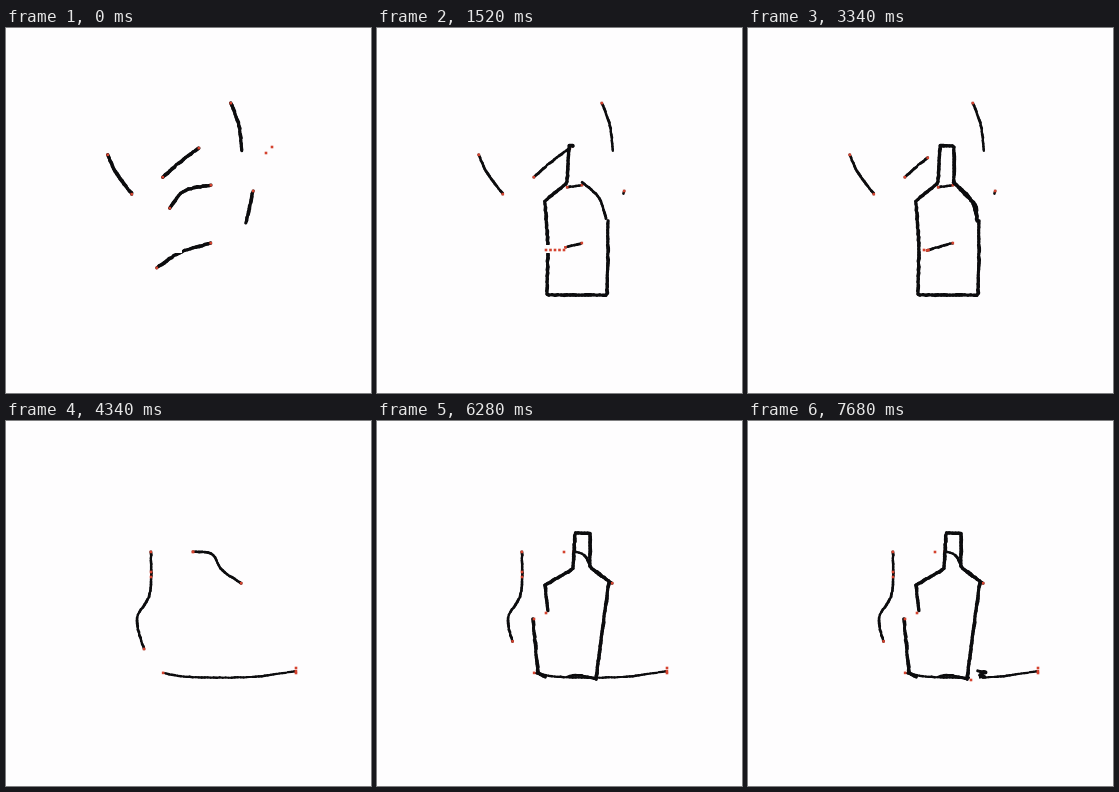
An HTML page with a canvas for the animation above (8000 ms loop, 365 px wide and 365 px high).

```html
<!DOCTYPE html>
<html lang="en">
<head>
<meta charset="utf-8">
<title>Bottle sketch</title>
<style>
html, body { margin: 0; width: 100%; height: 100%; overflow: hidden; background: #fefdfe; }
canvas { display: block; width: 100vw; height: 100vh; filter: blur(0.4px); }
</style>
</head>
<body>
<canvas id="stage" width="365" height="365"></canvas>
<script>
const ctx = document.getElementById('stage').getContext('2d');
const LOOP = 8000, CUT = 4340, STEP = 140;
const PAPER = '#fefdfe', INK = '#0c0c0e', RED = '#d4432f';
const THIN = 2.6, BOLD = 3.4;

const ramp = (k, a, b) => Math.max(0, Math.min(1, (k - a) / (b - a)));
const mix = (a, b, u) => a + (b - a) * u;
const stepAt = (t, start) => t < start ? 0 : Math.floor((t - start) / STEP) + 1;

// Seeded noise in -0.5..0.5
function noise(a, b) {
  const n = Math.sin(a * 12.9898 + b * 78.233) * 43758.5453;
  return n - Math.floor(n) - 0.5;
}

// Catmull-Rom curve through a few keys
function smooth(keys) {
  const out = [keys[0]];
  for (let i = 0; i < keys.length - 1; i++) {
    const b = keys[i], c = keys[i + 1], a = keys[i - 1] || b, d = keys[i + 2] || c;
    for (let u = 0.125; u <= 1; u += 0.125) {
      out.push([0, 1].map(n => b[n] + 0.5 * u * (c[n] - a[n]
        + u * (2 * a[n] - 5 * b[n] + 4 * c[n] - d[n] + u * (3 * (b[n] - c[n]) + d[n] - a[n])))));
    }
  }
  return out;
}

// Draws the stretch from..to of a path with a shaky pen and returns its ends.
function pen(path, width, from = 0, to = 1) {
  const dist = [0];
  for (let i = 1; i < path.length; i++) {
    dist.push(dist[i - 1] + Math.hypot(path[i][0] - path[i - 1][0], path[i][1] - path[i - 1][1]));
  }
  const total = dist[dist.length - 1];
  const at = d => {
    let i = 1;
    while (i < dist.length - 1 && dist[i] < d) i++;
    const u = (d - dist[i - 1]) / (dist[i] - dist[i - 1]);
    return [0, 1].map(n => mix(path[i - 1][n], path[i][n], u) + noise(d, total + n) * width * 0.2);
  };
  const first = at(total * from), end = total * to;
  let p = first;
  for (let d = total * from; d < end;) {
    d = Math.min(d + 3, end);
    const q = at(d);
    ctx.lineWidth = width * (1 + noise(d, total) * 0.25);
    ctx.beginPath();
    ctx.moveTo(...p);
    ctx.lineTo(...q);
    ctx.stroke();
    p = q;
  }
  return [first, p];
}

function dot(x, y) {
  ctx.fillStyle = RED;
  ctx.fillRect(x - 1.3, y - 1.3, 2.6, 2.6);
}

// A loose curve with red end points
function mark(keys, width, from = 0, to = 1, ends = 2) {
  pen(smooth(keys), width, from, to).slice(0, ends).forEach(p => dot(...p));
}

function erase(x, y, w, h) {
  ctx.fillStyle = PAPER;
  ctx.fillRect(x, y, w, h);
}

function tallBottle(k) {
  const w = k ? THIN : BOLD;
  mark([[102, 127], [110, 145], [126, 166]], w);
  mark([[225, 75], [233, 98], [236, 123]], w, 0, 1, 1);
  mark([[157, 149], [174, 134], [193, 120]], w, 0, mix(1, 0.64, ramp(k, 9, 13)));
  mark([[164, 180], [178, 163], [205, 157]], w, 0.7 * ramp(k, 5, 8));
  mark([[247, 163], [244, 177], [240, 195]], w, 0, mix(1, 0.08, ramp(k, 0, 3)), 1);
  mark([[151, 240], [173, 225], [205, 215]], w, 0.72 * ramp(k, 4, 8) - 0.17 * ramp(k, 10, 14));

  // Around the bottle clockwise, back to the right shoulder
  pen(smooth([[205, 154], [222, 170], [229, 191]]), THIN, 0, ramp(k, 0, 2));
  const outline = [
    [231, 193], [231, 230], [230, 267], [170, 267], [171, 218], [168, 173],
    [190, 155], [192, 118], [206, 118], [206, 155], [228, 177], [229, 193]
  ];
  pen(outline, BOLD, 0, 0.76 * ramp(k, 2, 9) + 0.24 * ramp(k, 9, 15));

  if (k < 11) erase(165, 217, 11, 8);
  if (!k) { dot(260, 125); dot(266, 119); }
  if (k > 6) for (let x = k < 11 ? 169 : 176; x < (k < 11 ? 190 : 182); x += 4.5) dot(x, 222);
}

function wideBottle(k) {
  mark([[145, 131], [144, 172], [131, 198], [138, 228]], THIN, 0, mix(1, 0.92, ramp(k, 0, 3)));
  mark([[187, 131], [206, 133], [216, 149], [235, 162]], THIN, 0.15 * ramp(k, 8, 11));
  mark([[157, 252], [185, 256], [245, 256], [290, 250]], 2.2);
  dot(187, 131);
  for (const y of [151, 156]) dot(145, y);
  for (const y of [247, 252]) dot(290, y);

  // Left wall and base, then right wall, neck and left shoulder
  pen([[156, 198], [161, 252], [168, 256]], BOLD, 0, ramp(k, 0, 2));
  pen(smooth([[190, 256], [201, 254], [219, 258]]), THIN, 0, ramp(k, 2, 3));
  const outline = [
    [219, 258], [225, 212], [232, 160], [213, 146], [213, 112],
    [198, 112], [196, 148], [168, 164], [171, 190]
  ];
  pen(outline, BOLD, 0, 0.37 * ramp(k, 3, 5) + 0.63 * ramp(k, 5, 12));

  if (k) dot(157, 198);
  if (k > 4 && k < 7) dot(229, 221);
  if (k > 11) dot(169, 192);

  // Gap rubbed into the base line
  erase(222, 250, 9 * ramp(k, 17, 22), 10);
  pen([[230, 250], [238, 251], [232, 254], [236, 256]], BOLD, 0, ramp(k, 19, 22));
  if (k > 20) dot(223, 259);
}

function draw(now) {
  const t = now % LOOP;
  erase(0, 0, 365, 365);
  ctx.strokeStyle = INK;
  ctx.lineCap = 'round';
  if (t < CUT) tallBottle(stepAt(t, 400));
  else wideBottle(stepAt(t, 4740));
}

const origin = performance.now();
function tick() {
  draw(performance.now() - origin);
  requestAnimationFrame(tick);
}
tick();
</script>
</body>
</html>
```
